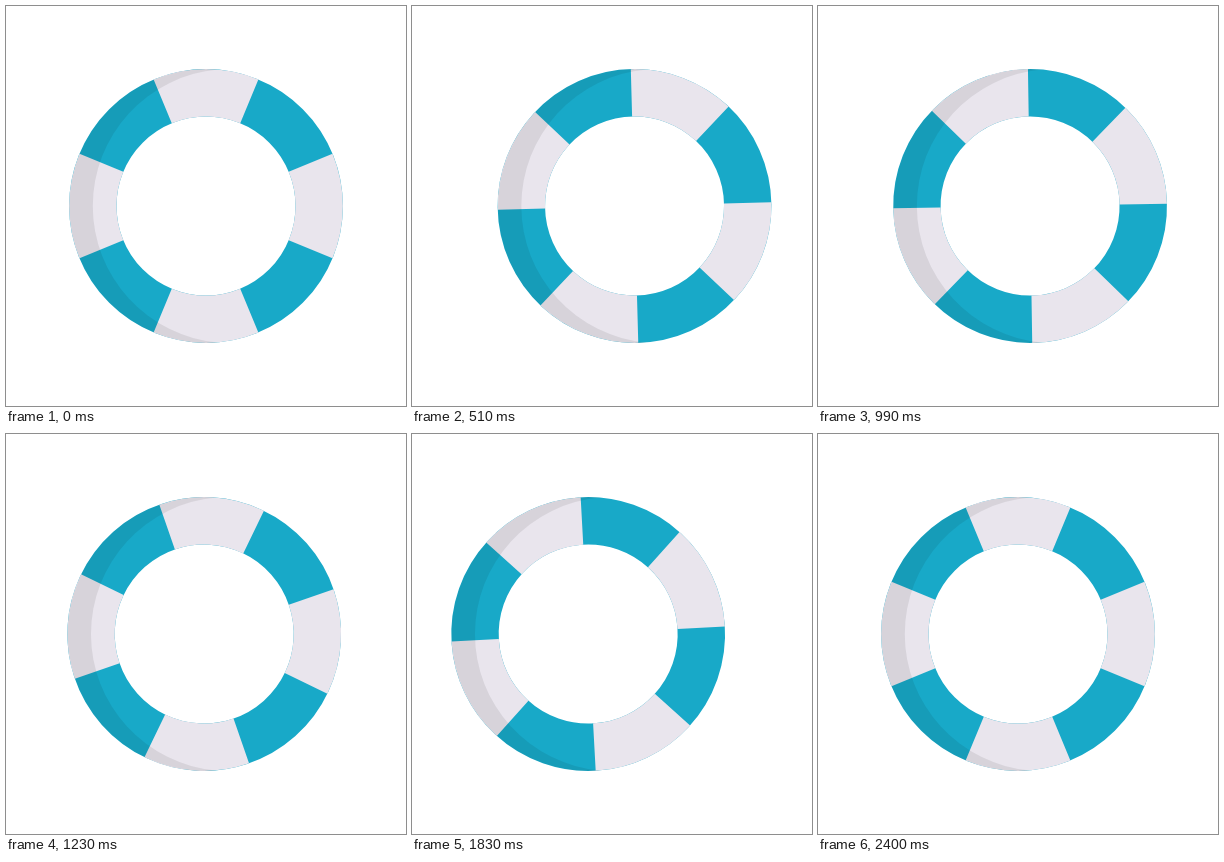
An HTML page for the animation above (2460 ms loop, 400 by 400 pixels).

```html
<!DOCTYPE html>
<html lang="en">
<head>
<meta charset="utf-8">
<title>Life ring</title>
<style>
  html, body { margin: 0; width: 100%; height: 100%; overflow: hidden; background: #fff; }
  svg { display: block; width: 100vw; height: 100vh; }
  circle { fill: none; stroke-width: 47.4; }
</style>
</head>
<body>
<svg viewBox="0 0 400 400">
  <g id="ring" transform="translate(200 200)">
    <g id="wheel">
      <circle r="113.2" stroke="#18a9c8"/>
      <circle r="113.2" stroke="#e9e5ed" pathLength="8" stroke-dasharray="1" stroke-dashoffset=".5"/>
    </g>
    <path fill="#000" fill-opacity=".08"
      d="M12-136.4A136.9 136.9 0 1 0 12 136.4A136.9 136.9 0 0 1 12-136.4Z"/>
  </g>
</svg>
<script>
  const LOOP = 2460, STEP = 30, END = 2400;
  const ring = document.getElementById('ring');
  const wheel = document.getElementById('wheel');

  // [time, horizontal offset]
  const sway = [[0, 0], [600, 24], [1800, -24], [END, 0]];

  const ease = p => p * p * (3 - 2 * p);

  function offsetAt(t) {
    const i = Math.max(1, sway.findIndex(([time]) => time >= t));
    const [t0, x0] = sway[i - 1], [t1, x1] = sway[i];
    return x0 + (x1 - x0) * ease((t - t0) / (t1 - t0));
  }

  const start = performance.now();

  function draw(now) {
    const elapsed = Math.max(0, now - start) % LOOP;
    const t = Math.min(END, Math.floor(elapsed / STEP) * STEP);
    ring.setAttribute('transform', `translate(${200 + offsetAt(t)} 200)`);
    wheel.setAttribute('transform', `rotate(${180 * ease(t / END)})`);
    requestAnimationFrame(draw);
  }

  draw(start);
</script>
</body>
</html>
```
